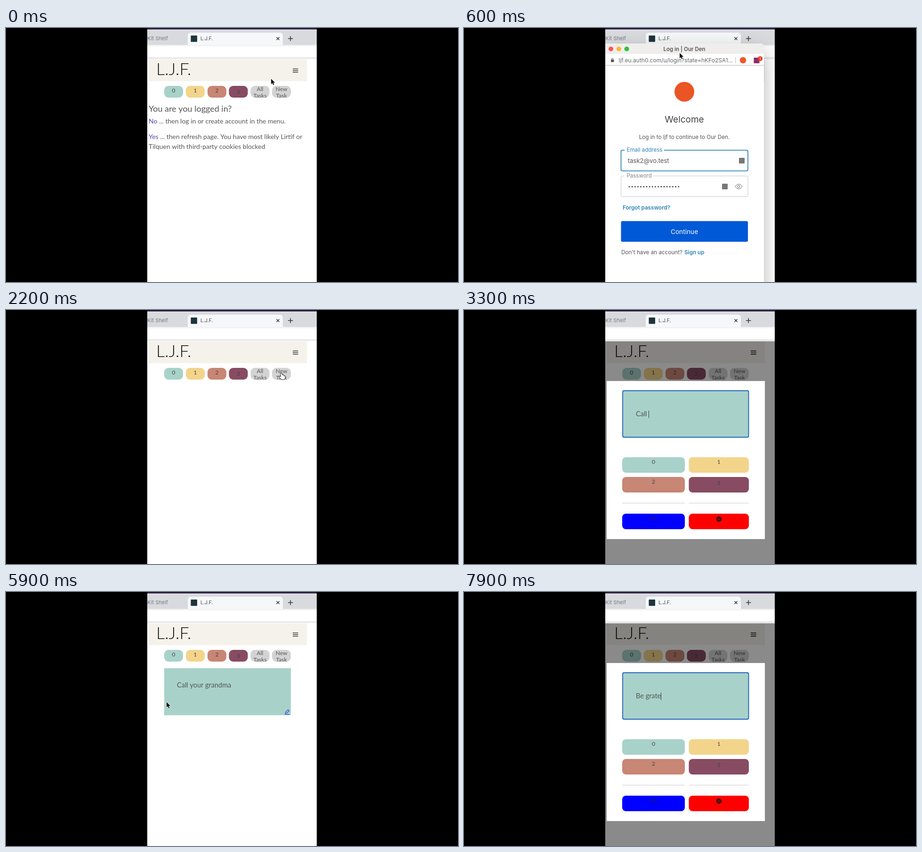
These frames come from a looping animation (960x540 px, 8 s). An HTML page with a canvas:

```html
<!DOCTYPE html>
<html lang="en">
<head>
<meta charset="utf-8">
<title>Task board</title>
<style>
html, body { margin: 0; width: 100%; height: 100%; overflow: hidden; background: #000; }
canvas { display: block; }
</style>
</head>
<body>
<canvas id="stage" width="960" height="540"></canvas>
<script>
const ctx = document.getElementById('stage').getContext('2d');
const LOOP = 8000, STEP = 100;
const PAGE = 'Lato, sans-serif', UI = 'Inter, sans-serif';
const MINT = '#a8d2c9', INK = '#555';
const COLORS = [MINT, '#f3d48b', '#c88674', '#874c62'];

// Pointer path: time, x, y, shape
const POINTER = [
  [0, 563, 108, 'arrow'], [300, 613, 88, 'hand'], [400, 590, 80, 'arrow'],
  [600, 458, 53, 'arrow'], [700, 458, 53, 'arrow'], [1200, 458, 14.5, 'arrow'],
  [1300, 488, 437, 'hand'], [1400, 488, 437, 'arrow'], [1700, 454, 534, 'hand'],
  [1900, 454, 528, 'arrow'], [2200, 584, 134, 'hand'], [2500, 584, 134, 'arrow'],
  [2700, 458, 221, 'beam'], [3000, 458, 221, ''], [4900, 400, 330, 'arrow'],
  [5000, 370, 384, 'hand'], [5300, 356, 448, 'hand'], [5700, 356, 448, 'arrow'],
  [5900, 341, 234, 'arrow'], [6000, 341, 234, 'arrow'], [6300, 584, 134, 'hand'],
  [6500, 584, 134, 'arrow'], [6900, 460, 221, 'beam'], [7500, 460, 221, ''], [LOOP, 460, 221, '']
];

const smooth = p => { p = Math.min(1, Math.max(0, p)); return p * p * (3 - 2 * p); };

function rect(x, y, w, h, fill, r = 0, stroke, lineWidth = 1) {
  ctx.beginPath();
  ctx.roundRect(x, y, w, h, r);
  if (fill) { ctx.fillStyle = fill; ctx.fill(); }
  if (stroke) { ctx.strokeStyle = stroke; ctx.lineWidth = lineWidth; ctx.stroke(); }
}

function dot(x, y, r, fill) {
  ctx.beginPath();
  ctx.arc(x, y, r, 0, 7);
  ctx.fillStyle = fill;
  ctx.fill();
}

function line(points, color, width = 1) {
  ctx.beginPath();
  points.forEach(([x, y]) => ctx.lineTo(x, y));
  ctx.strokeStyle = color;
  ctx.lineWidth = width;
  ctx.stroke();
}

// Draws text on a baseline and returns its width
function text(str, x, y, size, color = INK, family = PAGE, align = 'left', weight = 400) {
  ctx.font = `${weight} ${size}px ${family}`;
  ctx.textAlign = align;
  ctx.fillStyle = color;
  ctx.fillText(str, x, y);
  return ctx.measureText(str).width;
}

function digit(n, x, y) {
  text(n, x, n === 3 ? y + 3 : y, 12, '#444', PAGE, 'center');
}

function browser() {
  rect(300, 0, 360, 540, '#fff');
  rect(300, 0, 360, 3, '#2b2040');
  rect(300, 3, 360, 35, '#d8dade');
  rect(386, 10, 202, 28, '#f6f7f8', [6, 6, 0, 0]);
  rect(300, 36, 360, 3, '#f2f3f4');
  rect(300, 62, 360, 4, '#e9eaeb');
  text('Kit Shelf', 344, 26, 11, '#777b80', UI, 'right');
  rect(392.5, 16, 13.5, 13.5, '#1d343b', 1);
  text('L.J.F.', 413, 26, 10.5, '#45484c', UI);
  line([[574.5, 19.5], [580.5, 25.5]], '#333', 1.4);
  line([[580.5, 19.5], [574.5, 25.5]], '#333', 1.4);
  line([[599, 22.5], [609.5, 22.5]], '#333', 1.5);
  line([[604.2, 17.3], [604.2, 27.7]], '#333', 1.5);
}

function header() {
  rect(303, 67, 336, 46, '#f5f2eb');
  text('L.J.F.', 319, 100, 36, '#111', PAGE, 'left', 300);
  [336, 382, 428, 473.5, 519.5, 565].forEach((x, i) => {
    rect(x, 123, 40, 25, COLORS[i] || '#d3d3d3', 9);
    if (i < 4) return digit(i, x + 20, 137);
    text(i === 4 ? 'All' : 'New', x + 20, 134, 12, INK, PAGE, 'center');
    text(i === 4 ? 'Tasks' : 'Task', x + 20, 147.5, 12, INK, PAGE, 'center');
  });
}

function menuIcon() {
  for (const y of [87, 90.5, 94]) line([[609, y], [620.5, y]], '#222', 1.3);
}

function loginHint() {
  const hint = (word, rest, y) => {
    const width = text(word, 303, y, 14, '#524aa6');
    text(rest, 303 + width, y, 14);
  };
  text('You are you logged in?', 303, 177.5, 18);
  hint('No', ' ... then log in or create account in the menu.', 202.5);
  hint('Yes', ' ... then refresh page. You have most likely Lirtif or', 236);
  text('Tilquen with third-party cookies blocked', 303, 256.5, 14);
}

function taskCard() {
  rect(336, 162, 269, 100, MINT);
  text('Call your grandma', 363, 202.5, 14.5);
  line([[593, 258.5], [594, 255], [599, 250], [601.5, 252.5], [596.5, 257.5], [593, 258.5]], '#2a48dd', 1.2);
  line([[592, 260.3], [602, 260.3]], '#2a48dd', 1.2);
}

function taskButton(x, y, w, color, hover) {
  if (hover) rect(x + 3, y + 3, w, 33, '#222', 8);
  rect(x, y, w, 33, color, 8);
}

function taskDialog(typed, caretOn, hover) {
  rect(300, 66.5, 360, 474, 'rgba(0,0,0,.46)');
  menuIcon();
  rect(303, 151, 336, 336, '#fff');
  rect(337, 171.5, 267.5, 99, MINT, 3, '#1c5fc4', 1.8);
  const caret = Math.round(365 + text(typed, 365, 226, 14.5)) + .5;
  if (caretOn) line([[caret, 214], [caret, 229.5]], '#333');
  COLORS.forEach((color, i) => {
    const x = i % 2 ? 477.5 : 336, w = i % 2 ? 127.5 : 133, y = i < 2 ? 313 : 355;
    const over = hover === 'high' && i === 2;
    taskButton(x, y, w, over ? '#b37766' : color, over);
    digit(i, x + w / 2, y + 14);
  });
  line([[336, 410.5], [469, 410.5]], '#ccc');
  line([[477.5, 410.5], [605, 410.5]], '#ccc');
  taskButton(336, 433, 133, hover === 'ok' ? '#0000e6' : '#00f', hover === 'ok');
  text('OK', 402.5, 447, 12, '#1a1a70', PAGE, 'center');
  taskButton(477.5, 433, 127.5, '#f00');
  dot(541.5, 444.5, 5.8, '#421414');
  line([[539.5, 442.5], [543.5, 446.5]], '#b01010');
  line([[543.5, 442.5], [539.5, 446.5]], '#b01010');
}

function field(y, label, focused) {
  const color = focused ? '#1a78ae' : '#c6c8cc';
  rect(333.5, y, 269.5, 44, '#fff', 3, color, focused ? 1.6 : 1);
  ctx.font = `11.5px ${UI}`;
  rect(341, y - 3, ctx.measureText(label).width + 8, 7, '#fff');
  text(label, 345.5, y + 3.5, 11.5, focused ? '#2b84b5' : '#7d828c', UI);
}

function credentials(email, focused) {
  field(259.8, 'Email address', focused);
  text(email, 348, 286.5, 13, '#555', UI);
  rect(584, 276, 12, 12, '#777', 1);
  field(314.5, 'Password', false);
  for (let i = 0; i < 18; i++) dot(351 + i * 6.16, 337.5, 1.4, '#444');
  rect(548, 331, 12, 12, '#777', 1);
  ctx.beginPath();
  ctx.moveTo(576, 337);
  ctx.quadraticCurveTo(583.5, 326.5, 591, 337);
  ctx.quadraticCurveTo(583.5, 347.5, 576, 337);
  ctx.strokeStyle = '#666';
  ctx.stroke();
  ctx.beginPath();
  ctx.arc(583.5, 337, 2.4, 0, 7);
  ctx.stroke();
}

function passwordRules() {
  const rules = ['At least 8 characters', 'At least 3 of the following:', 'Lower case letters (a-z)',
    'Upper case letters (A-Z)', 'Numbers (0-9)', 'Special characters (ex. !@#$%^&*)'];
  rect(333.5, 366.5, 269.5, 182.5, '#fff', 3, '#c6c8cc');
  text('Your password must contain:', 348, 391, 11.5, '#555', UI);
  rules.forEach((rule, i) => {
    const x = i < 2 ? 348 : 368, y = 410.5 + i * 23.55;
    line([[x + 1.5, y + .5], [x + 4.5, y + 4], [x + 10, y - 4.5]], '#2c9960', 1.3);
    text(rule, x + 20, y + 4, 11.5, '#3a9f6b', UI);
  });
}

function popup(t) {
  const signup = t >= 1400;
  ctx.save();
  ctx.translate(0, -38.5 * smooth((t - 700) / 500));
  ctx.shadowColor = 'rgba(0,0,0,.3)';
  ctx.shadowBlur = 40;
  ctx.shadowOffsetY = 16;
  rect(298, 33, 339, 620, '#fff', 7);
  ctx.shadowColor = 'transparent';
  rect(300, 33, 337, 22, '#f0eeed', [7, 7, 0, 0]);
  ['#fb5550', '#fcb62f', '#2cc33f'].forEach((c, i) => dot(312 + i * 16.8, 44.5, 5, c));
  text(`${signup ? 'Sign up' : 'Log in'} | Our Den`, 468, 48.5, 11.5, '#555', UI, 'center', 600);

  rect(312, 67, 6.5, 5.5, '#555', 1);
  ctx.beginPath();
  ctx.arc(315.2, 66.5, 2, Math.PI, 0);
  ctx.strokeStyle = '#555';
  ctx.lineWidth = 1.2;
  ctx.stroke();
  text(`ljf.eu.auth0.com/u/${signup ? 'signup?state=hKFo2S...' : 'login?state=hKFo2SA1...'}`,
    328.5, 72.5, 12, '#666', UI);
  line([[576.5, 62], [576.5, 75]], '#bbb');
  dot(592.5, 68.5, 6.8, '#f1562b');
  rect(615.5, 63, 12, 12, '#8d2b66');
  dot(629, 65, 5.2, '#e8402a');
  text('1', 629, 68, 8, '#fff', UI, 'center');
  rect(300, 78, 337, 3, '#e2e2e2');

  dot(468, 135.5, 21, '#eb5424');
  text('Welcome', 468, 201, 19, '#444', UI, 'center');
  text(`${signup ? 'Sign Up' : 'Log in'} to ljf to continue to Our Den.`, 468, 235.5, 11.7, '#555', UI, 'center');
  credentials(signup ? 'trial3@v.test'.slice(0, (t - 1300) / 20) : 'task2@vo.test', t < 1600);
  if (signup) {
    passwordRules();
    rect(331.5, 567.5, 273.5, 48, '#bcd3f5', 4);
    rect(333.5, 569.5, 269.5, 44, '#0059d6', 3);
  } else {
    text('Forgot password?', 337, 386, 11.7, '#2b84b5', UI, 'left', 600);
    rect(333.5, 410.5, 269.5, 44, '#0059d6', 3);
    text('Continue', 468, 437.5, 13.7, '#fff', UI, 'center');
    text("Don't have an account?", 334, 481, 11.7, '#555', UI);
    text('Sign up', 468, 481, 11.7, '#2b84b5', UI, 'left', 600);
  }
  ctx.restore();
}

const SHAPES = {
  arrow: 'M0 0V11.5L2.7 9 4.6 13.2 6.5 12.4 4.7 8.3H8.3Z',
  hand: 'M-1 1Q0-1 1.3 1L2.6 5.2Q4-.2 5 5.8 6.5 4.5 7 6.6 9 6 8.7 9L7.6 13.5H1L-3.4 8.2Q-3.8 6.4-1.6 7.2L.2 8.4Z',
  beam: 'M-3-8Q0-8 0-6 0-8 3-8M0-6V6M-3 8Q0 8 0 6 0 8 3 8'
};

function pointer(t) {
  const i = POINTER.findIndex(key => key[0] > t);
  const [t0, x0, y0, shape] = POINTER[i - 1], [t1, x1, y1] = POINTER[i];
  if (!shape) return;
  const p = smooth((t - t0) / (t1 - t0)), path = new Path2D(SHAPES[shape]);
  ctx.save();
  ctx.translate(x0 + (x1 - x0) * p, y0 + (y1 - y0) * p);
  ctx.lineJoin = 'round';
  if (shape === 'beam') {
    ctx.strokeStyle = '#222';
    ctx.lineWidth = 1.1;
    ctx.stroke(path);
  } else {
    const arrow = shape === 'arrow';
    ctx.strokeStyle = arrow ? '#fff' : '#222';
    ctx.lineWidth = arrow ? 1.6 : 1.9;
    ctx.stroke(path);
    ctx.fillStyle = arrow ? '#111' : '#fff';
    ctx.fill(path);
  }
  ctx.restore();
}

function typedText(t) {
  if (t >= 6500) return 'Be grate'.slice(0, Math.max(0, (t - 7100) / 100));
  if (t < 3000) return '';
  const first = ['C', 'Ca', 'Call', 'Call ', 'Call y', 'Call yo', 'Call yo'];
  return first[(t - 3000) / 100] || 'Call your grandma'.slice(0, 9 + (t - 3700) / 100);
}

function draw(t) {
  ctx.fillStyle = '#000';
  ctx.fillRect(0, 0, 960, 540);
  ctx.save();
  ctx.beginPath();
  ctx.rect(300, 0, 360, 540);
  ctx.clip();
  browser();
  header();
  menuIcon();
  if (t < 1900) loginHint();
  if (t >= 5700 && t < 6500) taskCard();
  if (t >= 400 && t < 1900) popup(t);
  if (t >= 2500 && t < 5700 || t >= 6500) {
    const hover = t >= 5200 && t < 5700 ? 'ok' : t >= 5000 && t < 5200 ? 'high' : '';
    const caretOn = t >= 2700 && !(t >= 4700 && t < 4900) && !(t >= 6500 && t < 6900);
    taskDialog(typedText(t), caretOn, hover);
  }
  pointer(t);
  ctx.restore();
}

function tick() {
  draw(Math.floor(performance.now() % LOOP / STEP) * STEP);
  requestAnimationFrame(tick);
}
tick();
</script>
</body>
</html>
```
